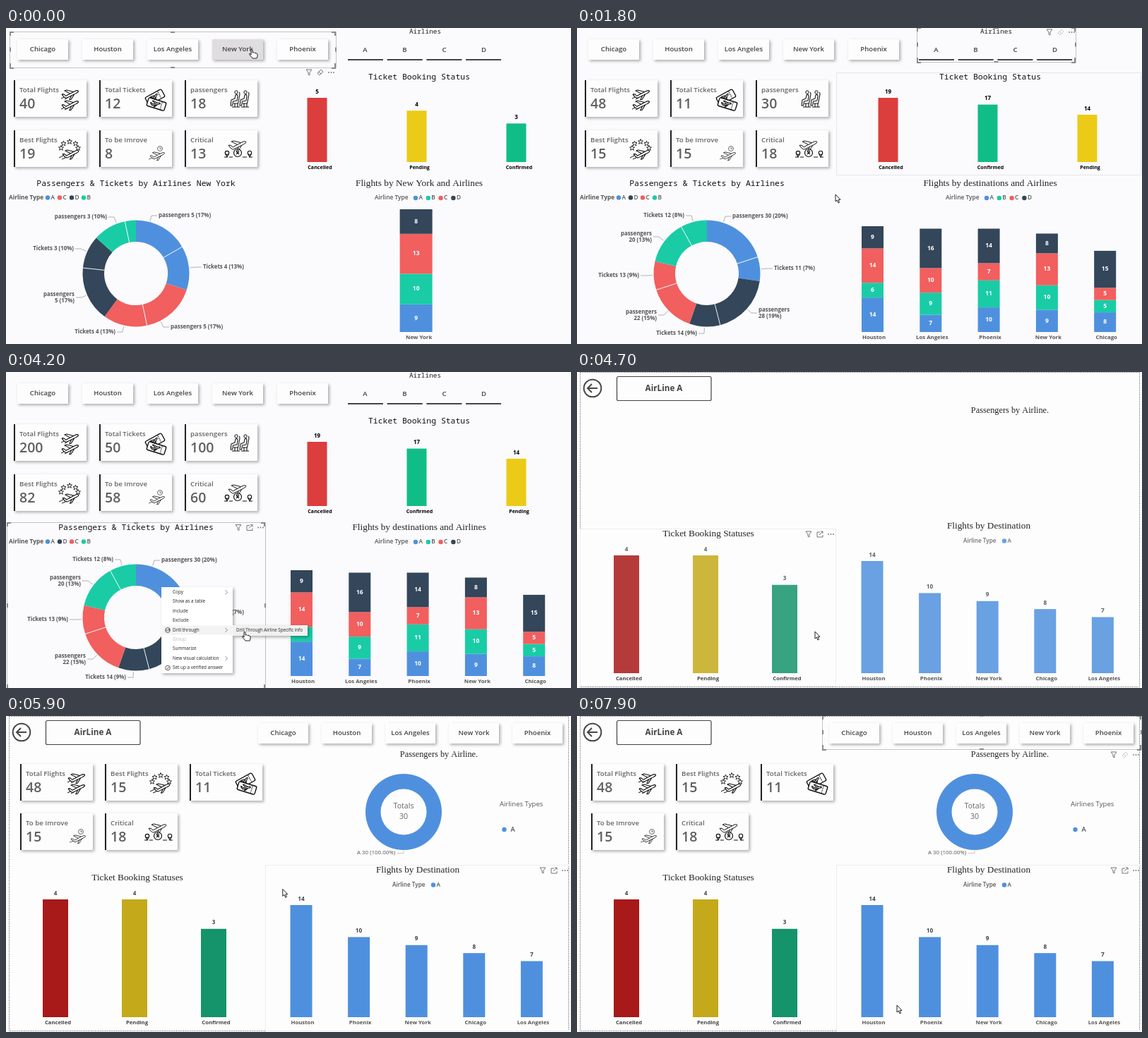
These frames come from a looping animation (800 by 448 pixels, 8 s). An HTML page with a canvas:

```html
<!DOCTYPE html>
<html lang="en">
<head>
<meta charset="utf-8">
<title>Flight dashboard</title>
<style>
html, body { margin: 0; width: 800px; height: 448px; overflow: hidden; background: #fbfafc; }
canvas { display: block; }
</style>
</head>
<body>
<canvas id="stage" width="800" height="448"></canvas>
<script>
const g = document.getElementById('stage').getContext('2d');
const LOOP = 8000, GREY = '#555', INK = '#252525';
const COLOR = { A: '#4f90de', B: '#19cca6', C: '#f15f5f', D: '#33465a' };
const STATUS1 = { Cancelled: '#dc3d3d', Pending: '#ebcb17', Confirmed: '#11bd86' };
const STATUS2 = { Cancelled: '#a81919', Pending: '#c4a91a', Confirmed: '#15936b' };
const CITIES = ['Chicago', 'Houston', 'Los Angeles', 'New York', 'Phoenix'];
const FLIGHTS = [
  ['Houston', { A: 14, B: 6, C: 14, D: 9 }],
  ['Los Angeles', { A: 7, B: 9, C: 10, D: 16 }],
  ['Phoenix', { A: 10, B: 11, C: 7, D: 14 }],
  ['New York', { A: 9, B: 10, C: 13, D: 8 }],
  ['Chicago', { A: 8, B: 5, C: 5, D: 15 }]
];
const sans = (size, weight = 400) => `${weight} ${size}px "Open Sans", "Noto Sans", sans-serif`;
const mono = size => `${size}px "Noto Sans Mono", monospace`;
const serif = size => `${size}px "Liberation Serif", serif`;

// Passengers and tickets per airline; labels are [x, y, two lines?]
const RINGS = {
  city: { title: ' New York', slices: 'A5 A4 C5 C4 D5 D3 B3 B1',
    labels: [[216, 266], [279, 339], [233, 424], [155, 431], [97, 382, 1], [96, 313], [143, 268]] },
  airline: { title: ' A', slices: 'A30 A11', labels: [[148, 429], [110, 291]] },
  all: { title: '', slices: 'A30 A11 D28 D14 C22 C13 B20 B12',
    labels: [[220, 267], [279, 341], [257, 404, 1], [170, 433], [113, 407, 1], [88, 351], [106, 296, 1], [152, 266]] }
};
const BOOKINGS = {
  city: [['Cancelled', 5], ['Pending', 4], ['Confirmed', 3]],
  airline: [['Cancelled', 4], ['Pending', 4], ['Confirmed', 3]],
  all: [['Cancelled', 19], ['Confirmed', 17], ['Pending', 14]],
  single: [['Cancelled', 1], ['Confirmed', 1], ['Pending', 1]]
};
const CARDS = { city: [40, 12, 18, 19, 8, 13], airline: [48, 11, 30, 15, 15, 18],
  all: [200, 50, 100, 82, 58, 60], single: [14, 3, 7, 2, 9, 3] };
const CARD_NAMES = ['Total Flights', 'Total Tickets', 'passengers', 'Best Flights', 'To be Imrove', 'Critical'];

// Pointer stops: time, x, y
const PATH = [[0, 347, 30], [300, 347, 30], [700, 513, 30], [1300, 513, 30], [1700, 366, 236], [1950, 366, 236],
  [2300, 222, 304], [2700, 222, 304], [3200, 262, 364], [3450, 262, 364], [3900, 337, 368], [5500, 337, 368],
  [6500, 492, 21], [7200, 492, 21], [7700, 453, 410], [8000, 453, 410]];

function text(s, x, y, font, color = GREY, align = 'center') {
  g.font = font; g.fillStyle = color; g.textAlign = align; g.textBaseline = 'middle';
  g.fillText(s, x, y);
}
function rect(x, y, w, h, color) { g.fillStyle = color; g.fillRect(x, y, w, h); }
function dot(x, y, r, color) { g.fillStyle = color; g.beginPath(); g.arc(x, y, r, 0, 7); g.fill(); }
function ring(x, y, r) { g.beginPath(); g.arc(x, y, r, 0, 7); g.stroke(); }
function line(color, width, ...p) {
  g.strokeStyle = color; g.lineWidth = width; g.beginPath();
  for (let i = 0; i < p.length; i += 2) g.lineTo(p[i], p[i + 1]);
  g.stroke();
}
function frame(x, y, w, h, color, width = 1) {
  g.strokeStyle = color; g.lineWidth = width; g.strokeRect(x + .5, y + .5, w, h);
}
function raised(x, y, w, h, color = '#fdfdfe') {
  g.save();
  g.shadowColor = 'rgba(0,0,0,.32)'; g.shadowBlur = 4; g.shadowOffsetX = g.shadowOffsetY = 2;
  rect(x, y, w, h, color);
  g.restore();
}
function veil(x, y, w, h, amount) {
  g.globalAlpha = amount; rect(x, y, w, h, '#fdfdfd'); g.globalAlpha = 1;
}
function selection(x, y, w, h) {
  frame(x, y, w, h, '#c4c4c4');
  const c = '#8a8a8a', r = x + w, b = y + h, mx = x + w / 2, my = y + h / 2;
  for (const [px, py, sx, sy] of [[x, y, 1, 1], [r, y, -1, 1], [x, b, 1, -1], [r, b, -1, -1]])
    line(c, 2, px + 6 * sx, py + 1, px + 1 * sx, py + 1, px + 1 * sx, py + 6 * sy);
  for (const py of [y + 1, b]) line(c, 2, mx - 3, py, mx + 3, py);
  for (const px of [x + 1, r]) line(c, 2, px, my - 3, px, my + 3);
}
function tools(x, y, erase, dim) {
  const c = '#777';
  line(c, 1, x - 4, y - 4, x + 4, y - 4, x + 1, y, x + 1, y + 4, x - 1, y + 3, x - 1, y, x - 4, y - 4);
  if (erase) {
    const e = dim ? '#ccc' : c;
    line(e, 1, x + 12, y + 1, x + 17, y - 4, x + 20, y - 1, x + 15, y + 4, x + 12, y + 1);
    line(e, 1, x + 14, y - 1, x + 17, y + 2);
  } else {
    line(c, 1, x + 16, y - 3, x + 12, y - 3, x + 12, y + 4, x + 20, y + 4, x + 20, y + 1);
    line(c, 1, x + 15, y + 1, x + 20, y - 4, x + 17, y - 4);
    line(c, 1, x + 20, y - 4, x + 20, y - 1);
  }
  for (const d of [28, 31.5, 35]) dot(x + d, y, .9, c);
}

const PLANE = new Path2D('M0 7L3 7L6 9.5L18 3Q23 .5 24 2.5Q24 4 20 6L7 12.5Q4 13 0 7M12 6L4 2L7 1L17 3.5M14 9L11 15L13.5 14.5L18 7');
const STAR = new Path2D('M0-3.5L1-1L3.5-1L1.6.7L2.3 3.3L0 1.8L-2.3 3.3L-1.6.7L-3.5-1L-1-1Z');
const SEATED = new Path2D('M7 7Q10 5 10 9L9 15L3.5 16L2.5 22L0 22L1 14L6 12ZM12.5 3L13 6L10.5 19L4 19M6 19L6 24M10 19L10 24M2 24L13 24');
function shape(path, x, y, scale = 1, turn = 0, width = 1.1) {
  g.save();
  g.translate(x, y); g.rotate(turn); g.scale(scale, scale);
  g.strokeStyle = '#111'; g.lineWidth = width / scale; g.lineJoin = 'round';
  g.stroke(path);
  g.restore();
}
const ICONS = [
  (x, y) => {
    for (const d of [0, 15]) {
      shape(PLANE, x + 68, y + 13 + d, .98);
      line('#111', 1, x + 67, y + 26 + d, x + 71, y + 24 + d);
      line('#111', 1, x + 72, y + 27 + d, x + 76, y + 25 + d);
    }
  },
  (x, y) => {
    for (const [dx, dy, turn] of [[79, 24, -.5], [81, 34, .3]]) {
      g.save();
      g.translate(x + dx, y + dy); g.rotate(turn);
      rect(-13, -6, 26, 12, '#fdfdfe');
      g.strokeStyle = '#111'; g.lineWidth = 1.4;
      g.beginPath(); g.roundRect(-13, -6, 26, 12, 2); g.stroke();
      g.setLineDash([2, 1]); line('#111', 1, 7, -5, 7, 5); g.setLineDash([]);
      shape(PLANE, -9, -4, .58);
      g.restore();
    }
  },
  (x, y) => {
    for (const d of [65, 78]) {
      shape(SEATED, x + d, y + 14);
      g.strokeStyle = '#111';
      ring(x + d + 8, y + 17, 2.2);
    }
  },
  (x, y) => {
    for (let i = 0; i < 5; i++) {
      const a = Math.PI * (1 + i * .25);
      shape(STAR, x + 79 + 12 * Math.cos(a), y + 25 + 9 * Math.sin(a), 1, 0, .9);
    }
    shape(PLANE, x + 69, y + 27, .95);
    line('#111', 1, x + 64, y + 39, x + 70, y + 36);
    line('#111', 1, x + 68, y + 41, x + 73, y + 39);
  },
  (x, y) => {
    shape(PLANE, x + 72, y + 30, .86, 0, .8);
    g.strokeStyle = '#444'; g.lineWidth = .8;
    ring(x + 86, y + 26, 3.5);
    line('#444', .8, x + 86, y + 24, x + 86, y + 26, x + 88, y + 26);
    line('#444', .8, x + 70, y + 41, x + 76, y + 39);
  },
  (x, y) => {
    shape(PLANE, x + 62, y + 14, 1.04, 0, 1);
    g.strokeStyle = '#111'; g.lineWidth = 1.2;
    ring(x + 75, y + 32, 5.5);
    line('#111', 1.2, x + 73, y + 30, x + 77, y + 34);
    line('#111', 1.2, x + 77, y + 30, x + 73, y + 34);
    for (const d of [60, 92]) {
      ring(x + d, y + 32, 2.7);
      line('#111', 1.1, x + d - 2, y + 34, x + d, y + 38, x + d + 2, y + 34);
    }
    for (const [a, b] of [[56, 60], [63, 68], [82, 88], [92, 96]]) line('#111', 1, x + a, y + 38, x + b, y + 38);
  }
];
function card(i, x, y, value) {
  raised(x, y, 103, 52);
  rect(x, y, 2, 52, '#222');
  text(CARD_NAMES[i], x + 8, y + 14.5, sans(9.7, 600), '#666', 'left');
  text(value, x + 8, y + 35, sans(19.5, 600), '#606060', 'left');
  ICONS[i](x, y);
}
function slicer(x, y, step, w, chosen) {
  CITIES.forEach((name, i) => {
    const left = x + i * step;
    raised(left, y, w, 29, name === chosen ? '#dfdddf' : '#fdfdfe');
    text(name, left + w / 2, y + 14.5, sans(9.6, 600), '#444');
  });
}
function bookings(list, colors, x, step, w, base, height, dx, ink, size) {
  const max = Math.max(...list.map(d => d[1]));
  list.forEach(([name, n], i) => {
    const cx = x + i * step, h = height * n / max;
    rect(cx - w / 2, base - h, w, h, colors[name]);
    text(n, cx, base - h - 8.5, sans(8, 700), ink);
    text(name, cx + dx, base + 7.7, sans(size, 700), ink);
  });
}
function flights(cities, series, x, step, base, height) {
  const keys = [...series], sum = d => keys.reduce((s, k) => s + d[1][k], 0);
  const list = FLIGHTS.filter(d => cities === 'all' || d[0] === cities).sort((a, b) => sum(b) - sum(a));
  const unit = height / sum(list[0]), single = list.length === 1, w = single ? 46 : 31;
  list.forEach((d, i) => {
    const cx = single ? x + step * 1.97 : x + i * step;
    let y = base;
    for (const k of keys) {
      const h = d[1][k] * unit;
      y -= h;
      rect(cx - w / 2, y, w, h, COLOR[k]);
      if (keys.length > 1) text(d[1][k], cx, y + h / 2, sans(8.5, 700), '#fff');
    }
    if (keys.length === 1) text(d[1].A, cx, y - 8.5, sans(8.3, 700), '#444');
    text(d[0], cx + (single ? 4 : 2), base + 8, sans(7.8, 700));
  });
}
function legend(keys, x, y, step, weight, size) {
  text('Airline Type', x, y, sans(size, weight), GREY, 'left');
  [...keys].forEach((k, i) => {
    const cx = x + (weight > 600 ? 55 : 58) + i * step;
    dot(cx, y, 3.2, COLOR[k]);
    text(k, cx + 4.5, y, sans(8.3, 600), GREY, 'left');
  });
}
function sector(x, y, R, r, a, b, color) {
  g.fillStyle = color; g.beginPath();
  g.arc(x, y, R, a, b); g.arc(x, y, r, b, a, true);
  g.fill();
}
function donut({ slices, labels }) {
  const x = 184, y = 348, parts = slices.split(' ').map(s => [s[0], +s.slice(1)]);
  const total = parts.reduce((s, p) => s + p[1], 0), seams = [];
  let a = -Math.PI / 2;
  parts.forEach(([k, n], i) => {
    const b = a + n / total * 2 * Math.PI;
    sector(x, y, 75.5, 45, a, b, COLOR[k]);
    if (parts.at(i - 1)[0] === k) seams.push(a);
    a = b;
  });
  for (const e of seams) {
    const c = Math.cos(e), s = Math.sin(e);
    line('#fff', .9, x + 45 * c, y + 45 * s, x + 76 * c, y + 76 * s);
  }
  labels.forEach(([lx, ly, split], i) => {
    const n = parts[i][1], word = i % 2 ? 'Tickets' : 'passengers', side = lx > x ? 1 : -1;
    const rest = `${n} (${Math.round(n / total * 100)}%)`, ex = lx - 10 * side;
    const t = Math.atan2(ly - y, ex - x), align = side > 0 ? 'left' : 'right', font = sans(7.9, 700);
    line('#aaa', .9, x + 77 * Math.cos(t), y + 77 * Math.sin(t), ex, ly, lx - 2 * side, ly);
    if (split) {
      text(word, lx, ly - 4.5, font, GREY, align);
      text(rest, lx, ly + 4.8, font, GREY, align);
    } else text(word + ' ' + rest, lx, ly, font, GREY, align);
  });
}

const MENU = ['Copy', 'Show as a table', 'Include', 'Exclude', 'Drill through', 'Group', 'Summarize',
  'New visual calculation', 'Set up a verified answer'];
function chevron(x, y) { line('#666', .8, x - 1.5, y - 3, x + 1.5, y, x - 1.5, y + 3); }
function menu(t) {
  raised(220, 305, 101, 122, '#fff');
  if (t > 3200) rect(221, 359.5, 99, 13, '#f3f3f3');
  MENU.forEach((s, i) => {
    const y = 312.3 + i * 13.4;
    text(s, 236, y, sans(6.4), s === 'Group' ? '#bbb' : '#222', 'left');
    if ([0, 4, 7].includes(i)) chevron(312, y);
    if (i === 4 || i === 8) { g.strokeStyle = '#333'; g.lineWidth = .8; ring(229, y, 3.4); }
  });
  line('#333', .8, 226, 366, 232, 366, 230, 364);
  line('#333', .8, 227.5, 419.5, 228.7, 421, 231, 418);
  if (t > 3400) {
    raised(321, 359, 106, 15, '#f1f0f0');
    text('Drill Through Airline Specific info', 326, 366.3, sans(6.2), '#222', 'left');
  }
}

function pageOne(t) {
  const mode = t < 350 ? 'city' : t >= 800 && t < 1500 ? 'airline' : 'all';
  const cardMode = t < 450 ? 'city' : t >= 950 && t < 1850 ? 'airline' : 'all';
  const data = RINGS[mode];
  rect(0, 0, 800, 448, '#fbfafc');
  slicer(16, 16, 92, 72, mode === 'city' ? 'New York' : '');
  if (mode === 'airline') rect(484, 14, 51, 30, '#e0dfe0');
  text('Airlines', 593.5, 5.5, mono(9.4), '#222');
  [...'ABCD'].forEach((k, i) => {
    text(k, 508.5 + i * 56, 31, sans(9.6, 600), '#444');
    rect(484 + i * 55.7, 44, 50, 2, '#444');
  });
  CARDS[cardMode].forEach((n, i) => card(i, 11 + i % 3 * 121, i < 3 ? 74 : 145, n));

  if (t >= 1600 && t < 2000) frame(367, 63, 431, 145, '#e6e5e8');
  text('Ticket Booking Status', 585, 70, mono(11.45), '#111');
  bookings(BOOKINGS[mode], STATUS1, 440.5, 141, 28, 190, 91, 4, '#000', 7.1);

  text('Passengers & Tickets by Airlines' + data.title, 184, 220.5, mono(11.45), '#111');
  legend([...new Set(data.slices.replace(/[^A-D]/g, ''))].join(''), 4, 240.5, 17, 700, 8.3);
  donut(data);

  const series = mode === 'airline' ? 'A' : 'ABCD', city = mode === 'city';
  text(`Flights by ${city ? 'New York' : 'destinations'} and ${series === 'A' ? 'A' : 'Airlines'}`, 585, 221, serif(13.3), INK);
  legend(series, series === 'A' ? 549 : 522, 241, 17.8, 600, 8.4);
  flights(city ? 'New York' : 'all', series, 418.5, 82.3, 431, city ? 174 : series === 'A' ? 160 : 150);

  if (t < 800) { selection(5, 5, 462, 51); tools(429, 63, true, mode !== 'city'); }
  else if (t < 2300) { selection(481, -1, 225, 49); tools(669, 6, true, mode !== 'airline'); }
  else { selection(1, 213, 366, 236); tools(329, 220.5); }
  if (t >= 2500) menu(t);
}

function pageTwo(t, px, py) {
  const single = t >= 6700 && t < 7350, list = BOOKINGS[single ? 'single' : 'airline'];
  const hidden = 1 - Math.min(1, Math.max(0, (t - 4900) / 500));
  rect(0, 0, 800, 448, '#fdfdfd');

  slicer(357, 10, 90, 71, single ? 'Houston' : '');
  const values = CARDS[single ? 'single' : 'airline'];
  [0, 3, 1, 4, 5].forEach((k, i) => card(k, 20 + i % 3 * 120, i < 3 ? 68 : 138, values[k]));
  bookings(list, STATUS2, 70, 112, 36, 427, 167, 3.5, '#444', 7.7);
  legend('A', 547, 239.5, 18, 600, 8.2);
  flights(single ? 'Houston' : 'all', 'A', 418, 81.6, 427, 159);
  veil(350, 4, 445, 42, hidden);
  veil(14, 60, 356, 142, hidden);
  veil(10, 233, 780, 195, hidden * .15);

  g.setLineDash([1, 1.5]); frame(4, 0, 792, 446, '#555'); g.setLineDash([]);
  g.strokeStyle = '#484848'; g.lineWidth = 2;
  ring(22, 23, 12.3);
  line('#484848', 2, 29, 23, 15, 23);
  line('#484848', 2, 21, 17, 15, 23, 21, 29);
  g.strokeStyle = '#444'; g.lineWidth = 1.2;
  g.beginPath(); g.roundRect(56.5, 6.5, 133.5, 34, 2); g.stroke();
  text('AirLine A', 123, 24, sans(11.7, 700), '#444');

  text('Passengers by Airline.', 613, 55, serif(12.3), INK);
  if (t >= 5300) {
    const n = single ? 7 : 30;
    sector(563, 136, 54, 32.5, 0, 2 * Math.PI, COLOR.A);
    text('Totals', 563, 128, sans(10.6), '#666');
    text(n, 563, 143, sans(10.6), '#666');
    line('#bbb', .8, 563, 191, 563, 194.5, 554, 194.5);
    text(`A ${n} (100.00%)`, 551, 194, sans(7.9), GREY, 'right');
    text('Airlines Types', 699, 125, sans(9.6), GREY, 'left');
    dot(705.5, 161, 3.2, COLOR.A);
    text('A', 714.5, 161, sans(9.7), '#222', 'left');
  }

  if (px < 367 && py > 222) { frame(4, 222, 362, 223, '#ededed'); tools(328, 230); }
  if (px >= 367 && py > 211) { frame(367, 211, 431, 235, '#ededed'); tools(760, 219); }
  text('Ticket Booking Statuses', 186, 230, serif(13.3), INK);
  text('Flights by Destination', 583, 219, serif(13.3), INK);
  if (t >= 6500) { selection(347, -1, 452, 48); tools(760, 55, true, !single); }
}

const HAND = new Path2D('M0 1Q1-.5 2 1L2 5L4 4.5L5 5.5L7 5.5L9 7L9 10L8 13L2 13L-2 8Q-3 6-1.5 6L0 8Z');
const ARROW = new Path2D('M0 0L0 10L2.3 8L4 12L5.6 11.2L4 7.5L7 7.3Z');
function pointer(x, y, hand) {
  g.save();
  g.translate(x, y);
  g.fillStyle = '#fff'; g.strokeStyle = '#222'; g.lineWidth = 1; g.lineJoin = 'round';
  const p = hand ? HAND : ARROW;
  g.fill(p); g.stroke(p);
  g.restore();
}
function position(t) {
  const i = PATH.findIndex(p => p[0] > t), [t0, x0, y0] = PATH[i - 1], [t1, x1, y1] = PATH[i];
  const u = (t - t0) / (t1 - t0), e = u * u * (3 - 2 * u);
  return [x0 + (x1 - x0) * e, y0 + (y1 - y0) * e];
}
function draw() {
  const t = performance.now() % LOOP, [x, y] = position(t);
  if (t < 4600) pageOne(t); else pageTwo(t, x, y);
  pointer(x, y, y < 46 || (t >= 2900 && t < 4600));
  requestAnimationFrame(draw);
}
draw();
</script>
</body>
</html>
```
